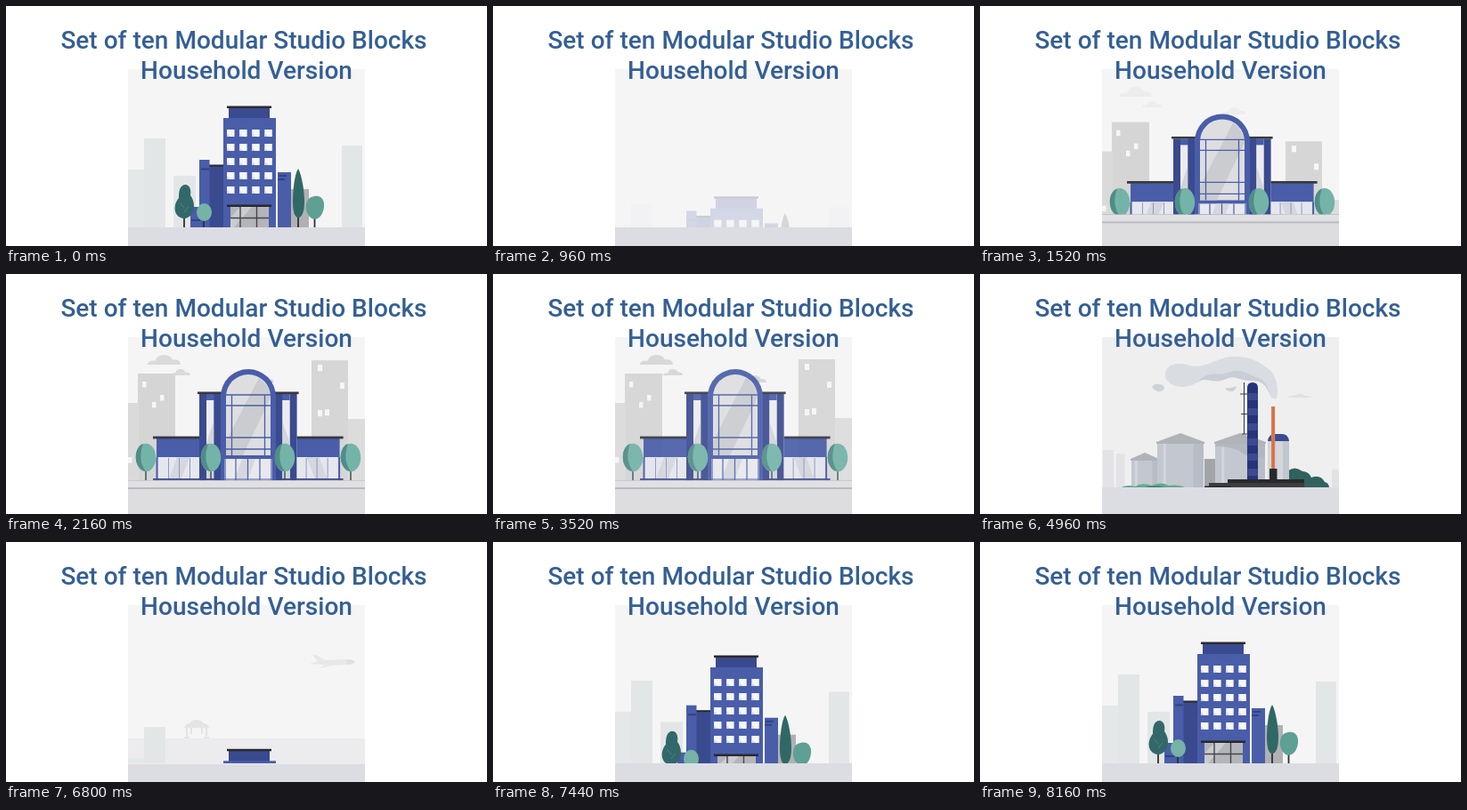
An HTML page that plays this animation: 540 by 270 pixels, repeating every 8240 ms.

```html
<!DOCTYPE html>
<html lang="en">
<head>
<meta charset="utf-8">
<title>Buildings</title>
<style>
html, body { margin: 0; width: 100%; height: 100%; overflow: hidden; background: #fff; }
svg { display: block; width: 540px; height: 270px; }
text { font: 500 28px Roboto, "Open Sans", sans-serif; fill: #345f95; text-anchor: middle; }
</style>
</head>
<body>
<svg id="stage" viewBox="0 0 540 270"></svg>
<script>
const PERIOD = 8240, STEP = 80;
const BLUE = '#495da9', NAVY = '#3a4a8f', DARK = '#29292d';

const rect = (x, y, w, h, fill, extra = '') =>
  `<rect x="${x}" y="${y}" width="${w}" height="${h}" fill="${fill}" ${extra}/>`;
const path = (d, fill) => `<path d="${d}" fill="${fill}"/>`;
const line = (d, color, width = 1) => `<path d="${d}" fill="none" stroke="${color}" stroke-width="${width}"/>`;
const oval = (x, y, rx, ry, fill) => `<ellipse cx="${x}" cy="${y}" rx="${rx}" ry="${ry}" fill="${fill}"/>`;
const mirror = (art, axis) => art + `<g transform="translate(${axis * 2} 0) scale(-1 1)">${art}</g>`;

// Office tower
function officeWindows() {
  let art = '';
  for (let row = 0; row < 5; row++)
    for (let col = 0; col < 4; col++) {
      const x = 248 + col * 14.1, y = 139 + row * 16;
      art += rect(x, y, 8.5, 8, '#f6f6f8') + path(`M${x} ${y + 8}V${y + 4}L${x + 4} ${y + 8}Z`, '#d5d8e3');
    }
  return art;
}
const officeTower =
  rect(250, 114, 46, 13, NAVY) + rect(248, 112.5, 50, 2.5, DARK) +
  rect(244, 126, 59, 124, BLUE) + officeWindows() +
  rect(252, 226, 43, 24, '#b4b5b8') + path('M252 249V238L263 226H276L256 249Z', '#cbccd0') +
  line('M252 238.5H295M263 226V250M281.5 226V250', '#45454c', 1.4) +
  rect(248, 223.5, 50, 2.5, DARK);
const officeWings =
  rect(228, 179, 16, 71, NAVY) + rect(228, 178.5, 16, 2, DARK) + rect(217, 173, 11.5, 77, BLUE) +
  rect(207, 226, 14, 24, BLUE) + rect(320, 206, 20, 44, '#b1b1b4') + rect(305, 187, 15, 63, BLUE) +
  line('M219 183.5H228M208 241H218M306 191H315M305 195H313', '#33437f', 2);
const officeTrees =
  line('M200 225V250M222 238V250M328 225V250M346.5 230V250', '#2c3237', 1.8) +
  path('M201 201C207 201 208 208 207 213C214 222 212 238 200 239C188 238 187 224 194 216C194 208 195 202 201 201Z', '#33686a') +
  oval(222.5, 232, 8.5, 10, '#76b3a6') +
  path('M328 183C332 190 335 208 335 220C335 232 332 238 328 238C324 238 322 231 322 220C322 207 324 189 328 183Z', '#2f6865') +
  path('M346 214C354 212 358 219 357 226C356 235 351 240 346 240C340 239 336 231 337 224C338 217 341 215 346 214Z', '#5fa094') +
  line('M200 232L205 226M200 227L195 221', '#4f8583');

// Glass hall
const hallTree = x => line(`M${x} 205V233`, '#3e5558', 1.5) +
  oval(x, 206.5, 11.2, 15.8, '#74b3a8') +
  path(`M${x - 3} 191C${x - 14} 194 ${x - 15} 219 ${x} 222C${x - 7} 213 ${x - 7} 202 ${x - 3} 191Z`, '#4f8d86');
const hallSide =
  rect(217, 135, 8, 98, NAVY) + rect(225, 135, 16, 98, BLUE) + rect(225, 142, 8.5, 91, '#ececf0') +
  path('M225 190L233.5 165V233H225Z', '#d3d4d9') + rect(233.5, 135, 8, 98, NAVY) + rect(215, 132.5, 28, 2.6, '#37383f') +
  rect(169, 185, 48, 21, BLUE) + rect(171, 206, 46, 27, '#e6e7ee') + rect(168.5, 206, 2, 27, BLUE) +
  path('M182 233L192 206H206L196 233Z', '#d5d6de') +
  line('M182.5 207V233M194.5 207V233M206.5 207V233', '#8d99c8') +
  rect(165, 182.6, 52, 2.8, '#37383f') + rect(165, 230, 80, 1.8, NAVY);
const hall =
  mirror(hallSide, 271.8) +
  path('M241 233V138A31 31 0 0 1 303 138V233Z', BLUE) +
  path('M247 204V138A25 25 0 0 1 297 138V204Z', '#dedee1') +
  path('M247 188L284 117Q296 125 297 139L266 204H247Z', '#cbcccf') +
  line('M247 136H297M247 148H297M247 184H297M247 197H297M253.5 136V204M290.5 136V204', BLUE, 1.3) +
  rect(245, 208, 54, 25, '#e8e8ee') + path('M256 233L265 208H280L271 233Z', '#d6d7de') +
  line('M246 208V233M258 208V233M271.5 208V233M285 208V233M298 208V233M241 231H303', BLUE, 1.2) +
  [157, 230, 313, 387].map(hallTree).join('');
const hallLeft = rect(148, 112, 42, 145, '#d5d5d6') + rect(137, 145, 12, 112, '#dadadb') +
  [[153, 121], [164, 144], [173, 136], [137, 206]].map(([x, y]) => rect(x, y, 4.5, 6.5, '#f6f6f6')).join('');
const hallRight = rect(343, 96, 41, 150, '#d6d6d7') + rect(384, 162, 19, 84, '#dcdcdd') +
  [[350, 101], [375, 121], [350, 152], [358, 151]].map(([x, y]) => rect(x, y, 5, 7, '#f7f7f7')).join('');
const cloud = (x, y, w, h) =>
  path(`M${x} ${y + h}q0 ${-h * .45} ${w * .25} ${-h * .4}q${w * .02} ${-h * .6} ${w * .25} ${-h * .6}q${w * .2} 0 ${w * .25} ${h * .5}q${w * .25} ${-h * .1} ${w * .25} ${h * .5}Z`, '#d8d8d9');
const hallClouds = cloud(165, 91, 37, 11) + cloud(191, 107, 22, 7) + cloud(281, 114, 26, 8);
const pavement = rect(137, 232, 266, 60, '#dddde0') + rect(137, 232, 266, 9, '#e1e1e3') +
  rect(137, 231.4, 266, 1.2, '#b9babe') + rect(137, 240, 266, 2, '#b7bac0');

// Factory
const silo = (x, w, eave, peak) =>
  rect(x, eave, w, 260 - eave, '#c3c7d0') + rect(x + w * .78, eave, w * .22, 260 - eave, '#b7bcc6') +
  rect(x + w * .13, eave, 3, 260 - eave, '#d2d6dd') +
  path(`M${x - 1} ${eave + 1}V${eave - 1}L${x + w / 2} ${peak}L${x + w + 1} ${eave - 1}V${eave + 1}Z`, '#b0b3b7');
let towerBands = '';
for (let y = 134; y < 228; y += 17) towerBands += rect(300.5, y, 11, 8, '#3c4b91');
const factory =
  rect(138, 198, 12, 60, '#e3e3e7') + rect(153, 202, 9.5, 58, '#e3e3e7') + rect(395, 220, 8, 40, '#e3e3e7') +
  silo(170, 30, 209, 201) + rect(252, 208, 12, 50, '#a4a5a9') + silo(264, 56, 190, 179) + silo(199, 52, 190, 179) +
  path('M264 191H320V207Q300 207 291 199Q282 194 264 194Z', '#b3b7be') +
  path('M345 240V222Q353 215 362 222Q369 222 372 229Q382 225 387 234Q392 235 392 241Z', '#30635d') +
  rect(323, 187, 24, 50, '#d3d6dc') + rect(340, 187, 7, 50, '#c2c6ce') +
  path('M323 188Q324 180 331 180H339Q346 180 347 188Z', '#3a4b92') +
  line('M296.5 122V180M292 135H300M293 157.5H300M294 180H300', '#3a3d4b', 1.1) +
  path('M300 235V128Q300 122 306 122Q312 122 312 128V235Z', '#26357a') + towerBands +
  rect(327, 149, 4.2, 72, '#df7d51') + line('M329.2 150V219', '#c9683f', 1) + rect(325, 219, 8.5, 13, DARK) +
  rect(278, 231, 86, 5, DARK) + rect(257, 235, 107, 6, '#3d3d40') + rect(252, 238.5, 30, 2, DARK) +
  path('M157 241Q164 236 174 239Q182 234 193 238Q203 233 212 238Q224 236 232 241Z', '#62a899') +
  path('M182 241Q196 236 211 241Z', '#3c7a73');
const smoke =
  path('M208 112C209 101 223 98 235 103C255 107 262 95 283 93C306 93 313 99 321 105C332 111 336 127 333 140C326 142 325 134 322 129C317 116 304 120 295 116C284 111 276 123 262 119C251 113 243 127 228 127C216 127 207 121 208 112Z', '#d9dce1') +
  path('M245 121C255 108 268 115 278 111C290 106 301 111 309 116C320 118 323 128 326 136C321 124 316 120 304 120C292 121 287 113 276 118C262 125 255 115 245 121Z', '#c9ced6');
const puffs =
  path('M193 127C196 122 206 123 207 128C206 134 197 134 193 127Z', '#cdd2d8') +
  path('M275 128Q281 129 288 126Q287 132 282 132Q277 132 275 128Z', '#cdd2d8') +
  path('M344 139Q350 136 355 136Q361 133 365 137Q371 137 372 139Z', '#dfe1e4');

// Pale airport glimpsed between two scenes
const airport =
  rect(137, 221, 266, 29, '#ececee') +
  path('M341 137L350 134L344 127H348L358 133L382 132V138L366 139L351 142L358 138Z', '#e8e8ea') +
  path('M382 132Q391 132 392 135Q391 138 382 138Z', '#e0e0e3') +
  path('M200 209Q202 204 206 204Q209 200 214 200Q219 200 222 204Q226 204 228 209Z', '#e4e4e6') +
  line('M203 209V220M208 209V216M220 209V216M225 209V220M200 220H206M222 220H228', '#e4e4e6', 2);

// Each part rises over [rise], sinks by [dist] over [sink], and fades over [show] and [hide].
const parts = [];
const add = (art, dist, rise, sink, show, hide, free = false) =>
  parts.push({ art, dist, rise, sink, show, hide, free });

add(airport, 0, [0, 1], [6800, 6960], [6560, 6760], [6820, 6980], true);

const addOffice = (art, dist, start, end) => add(art, dist, [start, end], [400, 1020], [6560, 6700], [620, 1040]);
addOffice(rect(137, 184, 18, 66, '#e4e8e9') + rect(155, 149, 24, 101, '#e2e6e7'), 100, 6560, 8060);
addOffice(rect(188, 191, 25, 59, '#e2e6e7') + rect(377, 157, 23, 93, '#e2e6e7'), 94, 6790, 8080);
addOffice(officeWings, 78, 6840, 8080);
addOffice(officeTower, 138, 6740, 8080);
addOffice(officeTrees, 68, 6900, 8120);

const addHall = (art, dist, rise, sinkEnd) => add(art, dist, rise, [3480, sinkEnd], [1000, 1480], [3440, 4340]);
addHall(hallLeft, 121, [1000, 2120], 4242);
addHall(hallRight, 137, [1216, 2400], 4444);
add(hallClouds, 0, [0, 1], [3480, 4320], [1280, 2240], [3600, 4360], true);
const cloudPart = parts[parts.length - 1];
addHall(hall, 130, [1000, 2000], 4340);

add(factory, 122, [4200, 4990], [6480, 6800], [4180, 4400], [6520, 6780]);
add(smoke, 165, [4130, 4980], [6480, 6820], [3960, 4150], [6480, 6760], true);
add(puffs, 20, [4320, 4980], [6480, 6820], [4400, 4960], [6480, 6760], true);

const stage = document.getElementById('stage');
stage.innerHTML = `
  <defs>
    <clipPath id="panel"><rect x="137" y="71" width="266" height="199"/></clipPath>
    <clipPath id="above"><rect id="horizon" x="137" y="71" width="266" height="178"/></clipPath>
  </defs>
  <g clip-path="url(#panel)">
    ${rect(137, 71, 266, 199, '#f5f5f6')}
    ${rect(137, 71, 266, 199, '#efeff0', 'id="haze"')}
    ${rect(137, 249, 266, 40, '#dcdde2', 'id="ground"')}
    <g id="pavement">${pavement}</g>
    ${parts.map(p => `<g clip-path="url(#${p.free ? 'panel' : 'above'})"><g class="part">${p.art}</g></g>`).join('')}
  </g>
  <text x="267" y="48">Set of ten Modular Studio Blocks</text>
  <text x="270" y="82">Household Version</text>`;
const nodes = stage.querySelectorAll('.part');
const find = id => document.getElementById(id);
const horizon = find('horizon'), ground = find('ground'), curb = find('pavement'), haze = find('haze');

const ramp = (t, [from, to]) => Math.min(1, Math.max(0, (t - from) / (to - from)));
const linear = x => x;
const cube = x => x * x * x;
// How far away a part is, 0 in place and 1 gone; intervals may wrap around the loop.
function away(t, enter, leave, ease) {
  const leaving = leave[0] < enter[0] ? t >= leave[0] && t < enter[0] : t >= leave[0];
  const wrapped = leave[0] < enter[0] && t < leave[0];
  if (wrapped) return 0;
  return ease(leaving ? ramp(t, leave) : 1 - ramp(t, enter));
}

function draw(t) {
  const hallGround = 17 * (1 - away(t, [1000, 2080], [3480, 4190], cube));
  const factoryGround = 9 * (1 - away(t, [4180, 4960], [6480, 6800], cube));
  const level = 249 - hallGround - factoryGround;
  horizon.setAttribute('height', level - 71);
  ground.setAttribute('y', level);
  ground.setAttribute('opacity', 1 - away(t, [4160, 4640], [3440, 4160], linear));
  curb.setAttribute('transform', `translate(0 ${level - 232})`);
  curb.setAttribute('opacity', 1 - away(t, [1000, 1480], [3520, 4320], linear));
  haze.setAttribute('opacity', 1 - away(t, [3600, 4400], [6480, 6800], linear));
  parts.forEach((p, i) => {
    const drift = p === cloudPart ? (t - 3520) * .0045 : 0;
    nodes[i].setAttribute('transform', `translate(${drift} ${p.dist * away(t, p.rise, p.sink, cube)})`);
    nodes[i].setAttribute('opacity', 1 - away(t, p.show, p.hide, linear));
  });
}

const began = performance.now();
function tick() {
  const t = (performance.now() - began) % PERIOD;
  draw(Math.floor(t / STEP) * STEP);
  requestAnimationFrame(tick);
}
tick();
</script>
</body>
</html>
```
